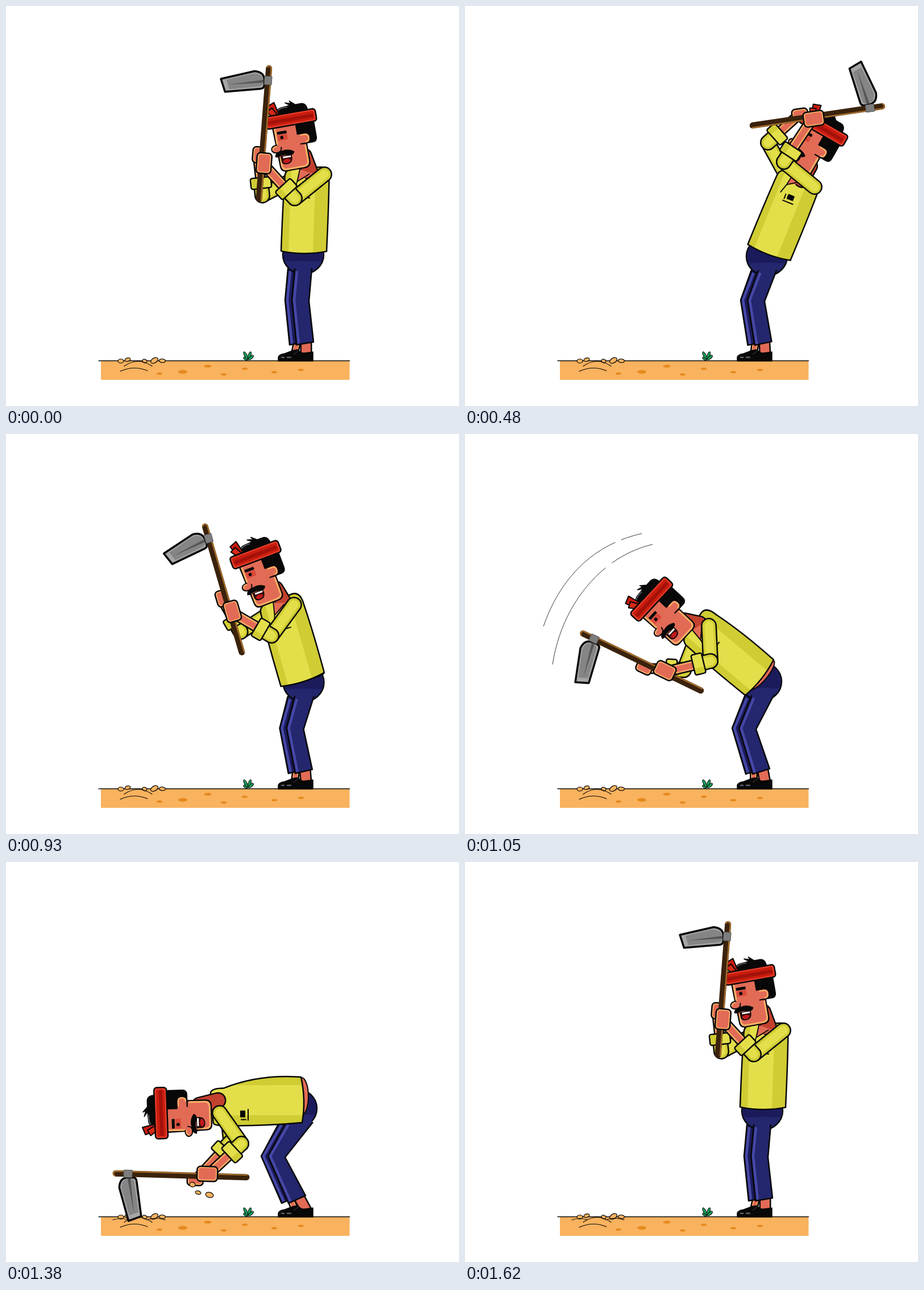
An HTML page with a canvas that plays this animation: 797 px wide and 703 px high, repeating every 1680 ms.

```html
<!DOCTYPE html>
<html lang="en">
<head>
<meta charset="utf-8">
<title>Digging</title>
<style>
html, body { margin: 0; width: 100%; height: 100%; overflow: hidden; background: #fff; }
canvas { display: block; }
</style>
</head>
<body>
<canvas id="stage" width="797" height="703"></canvas>
<script>
const c = document.getElementById('stage').getContext('2d');
const LOOP = 1680, STEP = 30, RAD = Math.PI / 180;
const INK = '#080808', SKIN = '#e26b56', GLOW = '#fbb066', NECK = '#c2412f';
const SHIRT = '#e3df4a', SHIRT_DARK = '#d0cc33', BLUE = '#24266e', NAVY = '#1b1b5c', SHEEN = '#4548a6';
const SOIL = '#f9b25e', SPOT = '#e58a1e';

// Pose: hem x y, torso angle, bend, pelvis x y, knee x, ankle x, head angle, hoe angle,
// grip distance, back hand lead, then points: head, shoulder, elbow, grip, back elbow.
const rest = [524, 431, 2, 0, 523, 437, 518, 526, -10, 4.4, 167, 13,
  509.5, 236, 560, 296, 508, 338, 450, 275, 451, 333];
const lift = [527, 432, 6.5, 0, 525.5, 438, 516, 525, 0, 21.2, 161, 12,
  535, 235, 570, 301, 513, 330, 468, 259, 460, 321];
const back = [535, 433, 22, 0, 531, 440, 512, 524.5, 30, 81.6, 122, -24,
  613, 250, 615, 318, 561, 274, 614, 194, 533, 240];
const forward = [528, 433, 8, 0, 525.5, 438, 514, 525, 1, 34.6, 154, 10,
  545, 237, 574, 303, 512, 329, 477, 243, 458, 310];
const swing = [518, 428, -50, -3, 521, 435, 497, 521, -47, -64.2, 158, 34,
  358, 315, 429, 337, 432, 399, 349, 419, 385, 415];
const dig = [520, 418, -90, -14, 511, 433, 476, 512, -92, -88.3, 161, 20,
  311, 438, 376, 441, 414, 495, 353, 552, 395, 492];

const turn = (x, y, deg) => {
  const s = Math.sin(deg * RAD), k = Math.cos(deg * RAD);
  return [x * k - y * s, x * s + y * k];
};

// Points move within the torso's own frame, so they follow its rotation.
const toLocal = p => {
  const q = p.slice();
  for (let i = 12; i < 22; i += 2) [q[i], q[i + 1]] = turn(p[i] - p[0], p[i + 1] - p[1], -p[2]);
  return q;
};
const keys = [[0, rest], [180, rest], [330, lift], [480, back], [630, back], [810, forward],
  [1050, swing], [1170, dig], [1380, dig], [1620, rest], [LOOP, rest]]
  .map(([t, p]) => [t, toLocal(p)]);

// Monotone cubic interpolation: smooth through the keys, no overshoot.
const rate = (i, n) => i < 0 || i > keys.length - 2 ? 0
  : (keys[i + 1][1][n] - keys[i][1][n]) / (keys[i + 1][0] - keys[i][0]);
const slope = (i, n) => {
  const a = rate(i - 1, n), b = rate(i, n);
  return a * b <= 0 ? 0 : 2 * a * b / (a + b);
};
function poseAt(t) {
  let i = 0;
  while (t >= keys[i + 1][0]) i++;
  const [t0, p] = keys[i], [t1, q] = keys[i + 1], h = t1 - t0, u = (t - t0) / h;
  return p.map((v, n) => {
    const ease = u * u * (3 - 2 * u);
    return v + (q[n] - v) * ease
      + h * u * (1 - u) * ((1 - u) * slope(i, n) - u * slope(i + 1, n));
  });
}

function at(x, y, deg, draw) {
  c.save();
  c.translate(x, y);
  c.rotate(deg * RAD);
  draw();
  c.restore();
}
function shape(d, fill, width = 2.5, ink = INK) {
  const path = typeof d === 'string' ? new Path2D(d) : d;
  if (fill) { c.fillStyle = fill; c.fill(path); }
  if (width) { c.strokeStyle = ink; c.lineWidth = width; c.stroke(path); }
}
function box(x, y, w, h, r, fill, width, ink) {
  const path = new Path2D();
  path.roundRect(x, y, w, h, r);
  shape(path, fill, width, ink);
}
function oval(x, y, rx, ry, fill, width = 0, deg = 0) {
  const path = new Path2D();
  path.ellipse(x, y, rx, ry, deg * RAD, 0, 7);
  shape(path, fill, width);
}
function limb(p, q, w, edge, core) {
  const d = `M${p}L${q}`;
  shape(d, null, w + 5);
  shape(d, null, w, edge);
  shape(d, null, w, edge);
  shape(d, null, w * .64, core);
}
// Layered strokes give a limb its outline, rim and core.
limb = (p, q, w, rim, core) =>
  [[w + 5, INK], [w, rim], [w * .68, core]].forEach(([n, ink]) => shape(`M${p}L${q}`, null, n, ink));

const clod = (x, y, rx, ry, deg) => oval(x, y, rx, ry, SOIL, 1.2, deg);

function ground(t) {
  c.fillStyle = SOIL;
  c.fillRect(167, 624, 437.5, 33);
  [[270, 646, 5], [311, 643, 8], [355, 633, 6.5], [383, 647.5, 5], [420, 637.5, 5],
    [472, 643.5, 5], [519, 639.5, 5]].forEach(([x, y, r]) => oval(x, y, r, r * .4, SPOT));
  shape('M163 623.5H604.5', null, 1.3);
  [[202, 624, 5, 3.5, 0], [214, 621.5, 5, 3, -15], [244, 624, 4, 3, 20],
    [261, 623, 7, 4.2, -30], [275, 623.5, 5.5, 3.2, 5]].forEach(s => clod(...s));
  shape('M208 633Q232 616 257 633M201 642Q225 631 249 641', null, 1.2);
  if (t >= 1140) shape('M188 629Q203 624 215 629M247 629Q264 623 280 629', null, 1.2);
  [[-62, 8], [-28, 15], [18, 14], [50, 11]].forEach(([deg, n]) =>
    at(426, 622, deg, () => oval(0, -n / 2 - 1, 2.3, n / 2, '#17a05c', 1)));
}

function streaks(t) {
  if (t < 1020 || t >= 1200) return;
  const top = 170 + Math.max(0, t - 1050) * 1.6;
  c.save();
  c.beginPath();
  c.rect(0, top, 400, 250 + (t - 1020) * 5.4 - top);
  c.clip();
  c.lineCap = 'butt';
  c.setLineDash([38, 11, 999]);
  shape('M311 175C220 195 165 260 138 338' + (t > 1050 ? 'Q128 370 126 400' : ''), null, .8);
  c.setLineDash([79, 14, 999]);
  shape('M330 194C240 215 170 300 154 405', null, .8);
  c.restore();
}

function debris(t) {
  const s = (t - 1230) / 150;
  if (s <= 0 || s >= 2) return;
  [[328, 567, 5, 4], [338, 581, 5, 3], [358, 585, 7, 4.5]].forEach(([x, y, rx, ry]) =>
    clod(235 + (x - 235) * s, 620 + (y - 620) * s * (2 - s), rx, ry, 15 + 60 * (s - 1)));
}

function leg(px, py, kx, ax, dx, fill) {
  const bend = 518 - kx, wide = 15 + bend * .2, tilt = 2.5 + bend * .1;
  const hx = px + dx + bend * .12, hy = py + 25;
  kx += dx;
  ax += dx;
  const left = `M${hx - wide} ${hy}L${kx - 15} 517L${ax - 15} ${593 + tilt}`;
  const right = `L${ax + 15} ${593 - tilt}L${kx + 15} 519L${hx + wide} ${hy}`;
  shape(`${left}${right}L${hx + wide - 6} ${hy - 14}H${hx - wide + 8}Z`, fill, 0);
  c.lineCap = 'butt';
  shape(`M${hx - wide + 4} ${hy + 4}L${kx - 11} 517L${ax - 11} ${591 + tilt}`, null, 4.5, SHEEN);
  c.lineCap = 'round';
  shape(left + right, null, 2.5);
}

function lowerBody([, , , , px, py, kx, ax]) {
  limb([ax - 13, 588], [508, 610], 9, GLOW, SKIN);
  leg(px, py, kx, ax, -12, NAVY);
  oval(px, py, 36, 34, BLUE, 2.5);
  c.fillStyle = NAVY;
  c.beginPath();
  c.ellipse(px, py, 35, 33, 0, Math.PI - .36, .36);
  c.fill();
  limb([ax + 2, 586], [528, 612], 16, SKIN, SKIN);
  leg(px, py, kx, ax, 0, BLUE);
  shape('M479 624V617Q481 612 490 611L506 605L514 604Q517 609 523 610L540 608V624Z', INK, 1.5);
  shape('M515 605Q511 610 506 612', null, 1, '#444');
  shape('M485 617.5H489M495 617.5H501', null, 2.4, '#59606a');
}

function torso([x, y, a, k]) {
  const top = -148 + k * .8;
  at(x, y, a, () => {
    if (a < -5) oval(6, 0, 33, Math.min(12, -a * .2), SKIN, 2);
    const body = new Path2D(`M-40 1Q0 8 40 -1Q${41 - k / 3} -75 ${40 + k * 1.4} ${top + 22}`
      + `Q${40 + k * 1.4} ${top - 1} ${25 + k} ${top - 1}L${-27 + k} ${top + 4}`
      + `Q${-38 + k / 2} ${top + 6} ${-38 + k / 2} ${top + 18}Q${-40 + k / 2} -75 -40 1Z`);
    c.save();
    c.clip(body);
    c.fillStyle = SHIRT;
    c.fillRect(-70, -190, 140, 210);
    c.fillStyle = SHIRT_DARK;
    c.fillRect(-70, -190, 43, 210);
    c.fillRect(16 - k * .7, -190, 80, 210);
    c.restore();
    shape(body);
    const px = -6 + k * 1.7;
    box(px - 1, -108, 12, 9, 1, INK, 0);
    shape(`M${px - 5} -106V-98M${px - 6} -94H${px + 13}`, null, 2);
  });
}

function head(x, y, a) {
  at(x, y, a, () => {
    c.translate(-535, -235);
    shape('M499 205H553V275Q553 285 543 285H510Q501 285 501 276Z', SKIN);
    shape('M502 210V237M503.5 262V275Q504 282.5 511 282.5H542Q550.5 282 550.5 274V247', null, 3, GLOW);
    shape('M540 205H572V235Q572 243 564 243H547V225H540Z', INK, 2);
    shape('M505 187Q511 174 522 174L536 173L528 167L538 170L536 165L545 173H556Q565 174 565 187Z', INK, 1.5);
    shape('M512 179Q518 174 530 175', null, 1.6, '#66707a');
    shape('M543 225H553Q561 225 561 234Q561 243 553 243H543', SKIN, 2.2);
    shape('M545 227.5H553Q558.5 228 558.5 234Q558.5 240.5 553 240.5', null, 2.4, GLOW);
    box(505, 221, 17, 10, 1, '#d9493a', 0);
    box(505, 215, 17, 5, 1, INK, 0);
    oval(512, 226, 2.8, 3, INK);
    shape('M501 238Q490.5 238 490.5 245Q492 251.5 501 251Q508 250 508 243', SKIN, 2);
    shape('M500 240Q493 240 493 245', null, 2, GLOW);
    shape('M505 259H523V265Q522 273 513 273Q505 273 505 266Z', '#3d090b', 1.6);
    shape('M507 267Q513 262 521 267Q519 272 513 272Q508 272 507 267Z', '#c01a1d', 0);
    c.fillStyle = '#fff';
    c.fillRect(508, 259.5, 14, 3);
    shape('M495 258Q496 250 508 249.5Q520 247 529 254Q527 260 520 258Q506 255 500 259Z', INK, 1);
    shape('M502 186L496 168L509 163L514 185Z', '#c91c0f', 2);
    shape('M501 187L494 177L504 172L512 187Z', '#d62a18', 2);
    box(488, 185.5, 90, 22, 5, '#c91c0f', 2.5);
    box(490.5, 188, 85, 17, 3, null, 2, '#e5402b');
    box(493, 194, 80, 6, 2, '#a3120a', 0);
  });
}

function hoe() {
  shape('M-83 26L-25 8Q-9 8 -7 20L-6 31Q-6 37 -12 38L-74 48Z', '#a6a6a6', 3.5);
  shape('M-73 27L-26 12Q-12 12 -10 20L-9 31L-14 34L-67 43Z', '#858585', 0);
  shape('M-69 35L-8 22L-8 27Z', '#565656', 0);
  box(-5.5, -4.5, 11, 241, 5.5, '#3a220c', 0);
  shape('M-4 -1Q0 -6 4 0V232', null, 2.4, '#a56c2a');
  box(-6.5, 15, 13, 15, 1, '#7d7d7d', 1, '#555');
}

function cuff(e, w) {
  const dir = Math.atan2(w[1] - e[1], w[0] - e[0]);
  const along = n => [e[0] + Math.cos(dir) * n, e[1] + Math.sin(dir) * n];
  limb(e, along(11), 23, SHIRT_DARK, SHIRT);
  at(...along(22), dir / RAD, () => {
    box(-9.5, -18, 19, 36, 3, SHIRT, 2.5);
    box(-8, -16.5, 16, 10, 2, SHIRT_DARK, 0);
  });
}

const fist = (x, y, w, h) => {
  box(x - w / 2, y - h / 2, w, h, 6, GLOW, 2.5);
  box(x - w / 2 + 3, y - h / 2 + 3, w - 6, h - 6, 4, SKIN, 0);
};

function draw(t) {
  c.clearRect(0, 0, 797, 703);
  c.lineJoin = c.lineCap = 'round';
  const p = poseAt(t), [x, y, a, k] = p, hoeA = p[9], grip = p[10], lead = p[11];
  const world = (lx, ly) => {
    const [dx, dy] = turn(lx, ly, a);
    return [x + dx, y + dy];
  };
  const [skull, shoulder, elbow, hand, elbow2] = [12, 14, 16, 18, 20].map(i => world(p[i], p[i + 1]));
  const onHoe = (hx, hy) => {
    const [dx, dy] = turn(hx, hy, hoeA);
    return [hand[0] + dx, hand[1] + dy];
  };
  const hand2 = onHoe(-8, -lead);

  ground(t);
  streaks(t);
  lowerBody(p);
  limb(world(-15 + k, -130), elbow2, 22, SHIRT_DARK, SHIRT);
  torso(p);

  const [nx, ny] = turn(10, 30, p[8]);
  limb([skull[0] + nx, skull[1] + ny], world(6 + k / 2, -140 + k * .5), 24, NECK, NECK);
  if (k > -8) at(x, y, a, () => {
    shape('M-12 -144L-16 -122L13 -136Z', SKIN, 0);
    shape('M-12 -144L-16 -122L5 -136M-16 -122L-21 -106', null, 1.8);
  });
  head(...skull, p[8]);

  limb(elbow2, hand2, 14, GLOW, SKIN);
  cuff(elbow2, hand2);
  at(...hand2, hoeA, () => fist(0, 0, 18, 28));
  at(...onHoe(0, -grip), hoeA, hoe);

  limb(elbow, hand, 15, GLOW, SKIN);
  limb(shoulder, elbow, 23, SHIRT_DARK, SHIRT);
  cuff(elbow, hand);
  at(...hand, hoeA, () => fist(4, 1, 26, 36));
  debris(t);
}

function frame() {
  const t = performance.now() % LOOP;
  draw(Math.floor(t / STEP) * STEP);
  requestAnimationFrame(frame);
}
frame();
</script>
</body>
</html>
```
